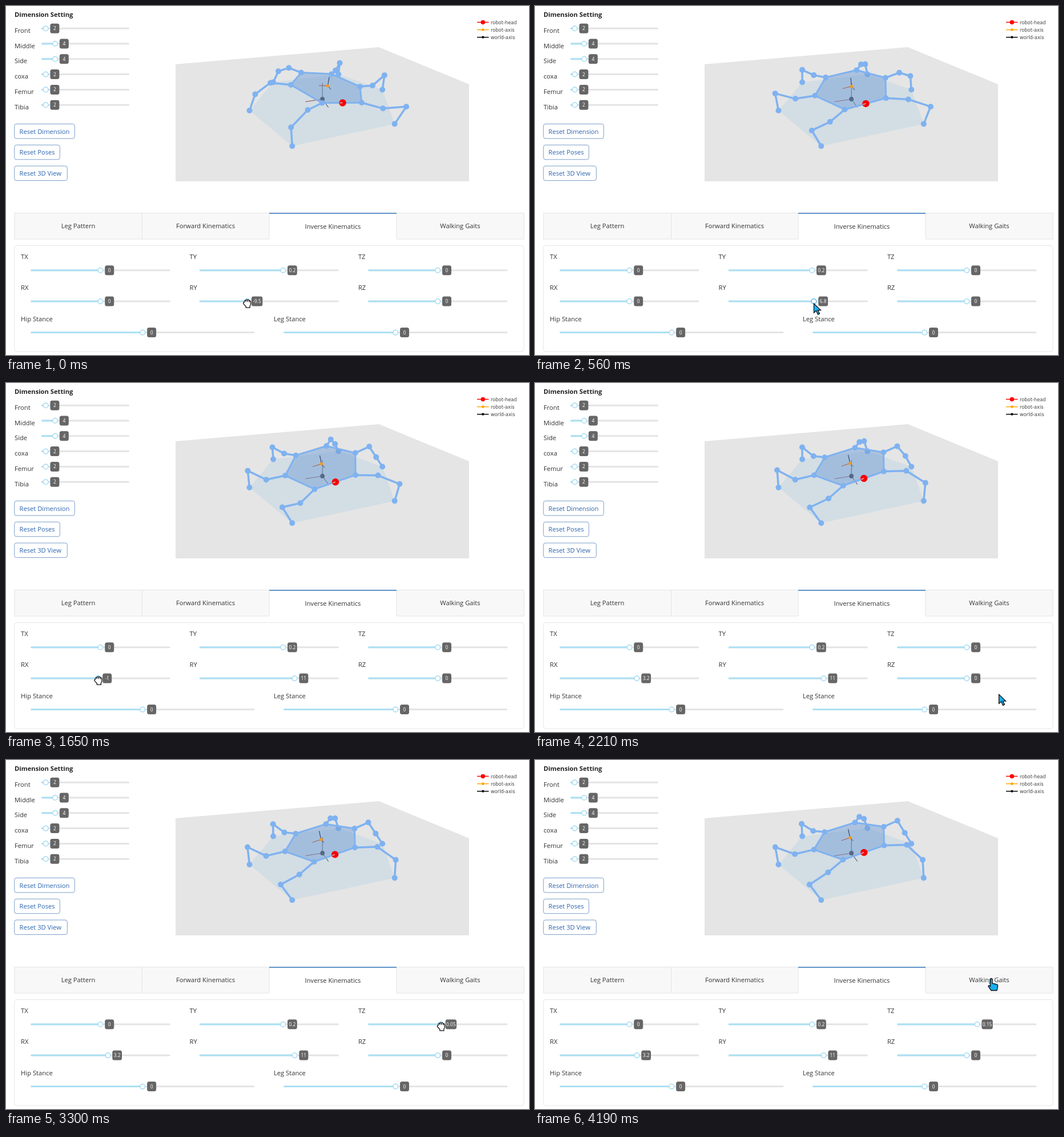
Animation of 916 by 611 pixels, one loop 4.27 s. Source, as an HTML page:

```html
<!DOCTYPE html>
<html lang="en">
<head>
<meta charset="utf-8">
<title>Hexapod kinematics panel</title>
<style>
html, body { margin: 0; width: 100%; height: 100%; overflow: hidden; background: #fff; }
svg { display: block; }
text { font: 11.2px "Open Sans", "Noto Sans", sans-serif; fill: #333; }
.title { font-weight: 700; fill: #222; }
.mid { text-anchor: middle; }
.link { fill: #2c64ae; }
.key { font: 8.3px "DejaVu Sans", sans-serif; fill: #444; }
.badge { font-size: 8.4px; fill: #fff; text-anchor: middle; }
.button { fill: #fff; stroke: #7d9fca; }
.bone { fill: none; stroke: #7fb2f0; stroke-width: 3.5; stroke-linejoin: round; }
.dot { fill: #7fb2f0; }
.body { fill: rgba(116, 160, 216, .5); stroke: #7fb2f0; stroke-width: 3; stroke-linejoin: round; }
.cursor { fill: #18b0f0; stroke: #111; stroke-width: 1.3; }
</style>
</head>
<body>
<svg id="stage" width="916" height="611" viewBox="0 0 916 611"></svg>
<script>
const stage = document.getElementById('stage');
const LOOP = 4270, STEP = LOOP / 54;

function add(tag, attrs, text) {
  const el = document.createElementNS('http://www.w3.org/2000/svg', tag);
  set(el, attrs);
  if (text !== undefined) el.textContent = text;
  return stage.appendChild(el);
}
function set(el, attrs) {
  for (const k in attrs) el.setAttribute(k, attrs[k]);
}
const label = (x, y, text, cls = '') => add('text', { x, y, class: cls }, text);
const line = (x1, y1, x2, y2, stroke, w = 1) =>
  add('line', { x1, y1, x2, y2, stroke, 'stroke-width': w });
const circle = (cx, cy, r, fill) => add('circle', { cx, cy, r, fill });
const dot = r => add('circle', { r, class: 'dot' });
const mix = (a, b, k) => a + (b - a) * Math.min(1, Math.max(0, k));

// Draws a slider and returns a setter for handle x, badge text and active state.
function slider(x, width, y, handle, value) {
  add('rect', { x, y: y - 1.5, width, height: 3, rx: 1.5, fill: '#e4e4e4' });
  const fill = add('rect', { x, y: y - 1.5, height: 3, rx: 1.5, fill: '#abe0f4' });
  const knob = add('circle', { cy: y, r: 4.3, fill: '#fff', 'stroke-width': 1.5 });
  const box = add('rect', { y: y - 8.5, height: 17, rx: 3.5, fill: '#666' });
  const text = add('text', { y: y + 2.9, class: 'badge' });
  const update = (px, val, active) => {
    const w = Math.max(16, 9 + 2.6 * val.length);
    set(fill, { width: px - x });
    set(knob, { cx: px, stroke: active ? '#62bde6' : '#a4dcf3' });
    set(box, { x: px + 7.8, width: w });
    set(text, { x: px + 7.8 + w / 2 });
    text.textContent = val;
  };
  update(handle, value, false);
  return update;
}

// Robot dimensions, also shown in the left column
const dims = { Front: 2, Middle: 4, Side: 4, coxa: 2, Femur: 2, Tibia: 2 };

label(15, 19, 'Dimension Setting', 'title');
Object.entries(dims).forEach(([name, size], i) => {
  label(15, 46.7 + 26.8 * i, name);
  slider(62, 154, 39.2 + 26.8 * i, 53.2 + 8.2 * size, String(size));
});
[['Reset Dimension', 105.5], ['Reset Poses', 79.500], ['Reset 3D View', 92.5]].forEach(([name, width], i) => {
  const y = 206.5 + 36.8 * i;
  add('rect', { x: 14.8, y, width, height: 25.5, rx: 3.5, class: 'button' });
  label(23.5, y + 17, name, 'link');
});

// Legend
[['robot-head', 'red', 3.8], ['robot-axis', 'orange', 2.3], ['world-axis', '#000', 2.1]].forEach(([name, color, r], i) => {
  const y = 28.5 + 13.1 * i;
  line(825, y, 845.5, y, color, 1.5);
  circle(835.3, y, r, color);
  label(849, y + 3, name, 'key');
});

// Tabs and panel
add('rect', { x: 14.8, y: 362.5, width: 892.2, height: 45.5, fill: '#f8f8f8', stroke: '#e4e4e4' });
add('rect', { x: 461, y: 362, width: 223, height: 47, fill: '#fff' });
for (const x of [238.5, 461, 684]) line(x, 363, x, 408, '#e4e4e4');
line(461, 362.9, 684, 362.9, '#4a84c4', 1.6);
['Leg Pattern', 'Forward Kinematics', 'Inverse Kinematics', 'Walking Gaits'].forEach((name, i) =>
  label(126.5 + 223 * i, i === 2 ? 389.8 : 389, name, 'mid'));
add('rect', { x: 14.8, y: 419.5, width: 892.2, height: 185.5, rx: 4, fill: 'none', stroke: '#e6e6e6' });

// Pose sliders: translations span -1..1, rotations -30..30
const controls = {};
['TX', 'TY', 'TZ', 'RX', 'RY', 'RZ'].forEach((name, i) => {
  const x = 43.3 + 295.4 * (i % 3), y = i < 3 ? 462.8 : 517.1;
  const scale = 122.1 / (i < 3 ? 1 : 30), unit = i < 3 ? 0.05 : 0.1;
  label(x - 17.2, y - 20, name);
  const update = slider(x, 244.3, y, x, '');
  const at = v => x + 122.1 + v * scale;
  const show = (v, active) =>
    update(at(v), String(+(Math.round(v / unit) * unit).toFixed(2)), active);
  show(name === 'TY' ? 0.2 : 0, false);
  controls[name] = { y, at, show };
});
[['Hip Stance', 43.3], ['Leg Stance', 486.2]].forEach(([name, x]) => {
  label(x - 17.2, 551.5, name);
  slider(x, 392, 571.6, x + 196, '0');
});

// Camera: turned about the vertical, raised, with perspective
const rad = deg => deg * Math.PI / 180;
const YAW = rad(18.5), PITCH = rad(27.9), DISTANCE = 23, FOCAL = 349.5;
function project([x, y, z]) {
  const near = x * Math.sin(YAW) + y * Math.cos(YAW);
  const right = y * Math.sin(YAW) - x * Math.cos(YAW);
  const up = z * Math.cos(PITCH) - near * Math.sin(PITCH);
  const zoom = FOCAL / (DISTANCE - near * Math.cos(PITCH) - z * Math.sin(PITCH));
  return [554.2 + right * zoom, 163 - up * zoom];
}

const plus = (a, b, k = 1) => a.map((v, i) => v + b[i] * k);
const dotProduct = (a, b) => a.reduce((sum, v, i) => sum + v * b[i], 0);
const points = list => list.map(p => p.join()).join(' ');
const place = (el, [cx, cy]) => set(el, { cx, cy });
function join(el, [x1, y1], [x2, y2]) {
  set(el, { x1, y1, x2, y2 });
}

const { Front, Middle, Side, coxa: COXA, Femur, Tibia } = dims;
const units = [[1, 0, 0], [0, 1, 0], [0, 0, 1]];
const corners = [
  [Front, -Side, Tibia], [-Front, -Side, Tibia], [-Middle, 0, Tibia],
  [-Front, Side, Tibia], [Front, Side, Tibia], [Middle, 0, Tibia]
];
// Feet stay planted where straight legs would stand.
const feet = corners.map(([x, y]) => {
  const reach = (COXA + Femur) / Math.hypot(Math.sign(x), Math.sign(y));
  return [x + Math.sign(x) * reach, y + Math.sign(y) * reach, 0];
});

// Scene
add('polygon', { points: '297,102 653,72 811,137 811,307 297,307', fill: '#e5e5e5' });
add('polygon', { points: points(feet.map(project)), fill: '#d3dde4' });
const legs = feet.map(foot => {
  const bone = add('polyline', { class: 'bone' });
  place(dot(5), project(foot));
  return { bone, joints: [dot(5), dot(5)] };
});
units.forEach((u, i) => {
  const axis = line(0, 0, 0, 0, ['#8c3030', '#222', '#333'][i], 0.9);
  join(axis, project([0, 0, 0]), project(plus([0, 0, 0], u, 2)));
});
circle(554.2, 163, 3.9, '#333');
const body = add('polygon', { class: 'body' });
const hipDots = corners.map(() => dot(4.9));
const robotAxes = ['#a85a48', '#4a4038', '#22305c'].map(c => line(0, 0, 0, 0, c));
const core = circle(0, 0, 2.7, '#f59a1c');
const head = circle(0, 0, 6.2, '#f50000');
const headLine = line(0, 0, 0, 0, '#dcb4bd', 1.5);

// Rotate about y then x, in degrees.
function rotate([x, y, z], rx, ry) {
  const [cx, sx, cy, sy] = [Math.cos(rad(rx)), Math.sin(rad(rx)), Math.cos(rad(ry)), Math.sin(rad(ry))];
  const depth = z * cy - x * sy;
  return [x * cy + z * sy, y * cx - depth * sx, y * sx + depth * cx];
}

// Coxa lies in the body plane; femur and tibia bend upwards to meet the foot.
function solveLeg(hip, foot, normal) {
  const span = plus(foot, hip, -1);
  const drop = dotProduct(span, normal);
  const flat = plus(span, normal, -drop);
  const reach = Math.hypot(...flat);
  const out = flat.map(v => v / reach);
  const coxa = plus(hip, out, COXA);
  const ahead = reach - COXA, d = Math.hypot(ahead, drop);
  const along = (Femur ** 2 - Tibia ** 2 + d * d) / (2 * d);
  const bend = Math.sqrt(Math.max(0, Femur ** 2 - along ** 2));
  const knee = plus(plus(coxa, out, (ahead * along - drop * bend) / d), normal, (drop * along + ahead * bend) / d);
  return [hip, coxa, knee, foot];
}

function drawRobot(rx, ry, tz) {
  const shift = [0, 0.2 * Side, tz * Tibia];
  const pose = p => plus(rotate(p, rx, ry), shift);
  const normal = rotate(units[2], rx, ry);
  legs.forEach((leg, i) => {
    const chain = solveLeg(pose(corners[i]), feet[i], normal).map(project);
    set(leg.bone, { points: points(chain) });
    place(hipDots[i], chain[0]);
    place(leg.joints[0], chain[1]);
    place(leg.joints[1], chain[2]);
  });
  const view = p => project(pose(p));
  const centre = [0, 0, Tibia];
  set(body, { points: points(corners.map(view)) });
  place(core, view(centre));
  robotAxes.forEach((el, i) => join(el, view(centre), view(plus(centre, units[i]))));
  place(head, view([0, Side, Tibia]));
  join(headLine, view([0, Side, Tibia]), view([0.3, Side, Tibia]));
}

// Slider drags: name, start, end, first and last value
const drags = [
  ['RY', 0, 480, -9.5, 6.8], ['RY', 700, 960, 6.8, 11],
  ['RX', 1440, 1660, 0, -1], ['RX', 1660, 1960, -1, 3.2],
  ['TZ', 2720, 2925, 0, -0.05], ['TZ', 2925, 3540, -0.05, 0.1], ['TZ', 3680, 3800, 0.1, 0.15]
];
function valueAt(name, t) {
  const own = drags.filter(d => d[0] === name);
  const [, start, end, from, to] = own.filter(d => d[1] <= t).pop() || own[0];
  return mix(from, to, (t - start) / (end - start));
}

// The pointer follows each drag, rests once aside and ends on the last tab.
const stops = drags.flatMap(([name, start, end, from, to]) => {
  const { at, y } = controls[name];
  return [[start, at(from), y + 4], [end, at(to), y + 4]];
}).concat([[2210, 813, 546], [4110, 799, 382], [LOOP, 799, 382]]).sort((a, b) => a[0] - b[0]);

function pointerAt(t) {
  const next = stops.findIndex(s => s[0] > t);
  const a = stops[next - 1], b = stops[next];
  const k = (t - a[0]) / (b[0] - a[0]);
  return [mix(a[1], b[1], k), mix(a[2], b[2], k)];
}

const cursors = {
  grab: add('path', { class: 'cursor', style: 'fill:#fff', d: 'M-5-3q0-3 3-2.5q1-2 3-.8q2-1 3 .8q2.5 0 2.5 3v3q0 2-1.5 3.5v3h-7v-2l-4-4.5q-1.5-2.5 1-2.5zM-2-5.5v2.5M1-6v3M4-5v2.5' }),
  arrow: add('path', { class: 'cursor', d: 'M0 0V16L4 12.5L7 19L10 17.5L7 11.5H12Z' }),
  point: add('path', { class: 'cursor', d: 'M-1.5 1.5q1.5-2 3.5 0V9l8 2q2 .6 1.5 3l-1.5 7.5h-10l-5-7q0-2.5 2-1.7l1.5 1.5z' })
};

function render(now) {
  const t = Math.floor((now % LOOP + 25) / STEP) * STEP % LOOP;
  const [px, py] = pointerAt(t);
  const values = ['RX', 'RY', 'TZ'].map(name => {
    const { at, y, show } = controls[name];
    const v = valueAt(name, t);
    show(v, Math.hypot(at(v) - px, y - py) < 9);
    return v;
  });
  drawRobot(...values);

  const dragging = drags.some(d => t > d[1] - 20 && t < d[2] + 20);
  const mode = dragging ? 'grab' : t > 4060 ? 'point' : 'arrow';
  for (const name in cursors) {
    set(cursors[name], {
      visibility: name === mode ? 'visible' : 'hidden',
      transform: `translate(${px} ${py})`
    });
  }
}

const begin = performance.now();
function tick() {
  render(performance.now() - begin);
  requestAnimationFrame(tick);
}
tick();
</script>
</body>
</html>
```
